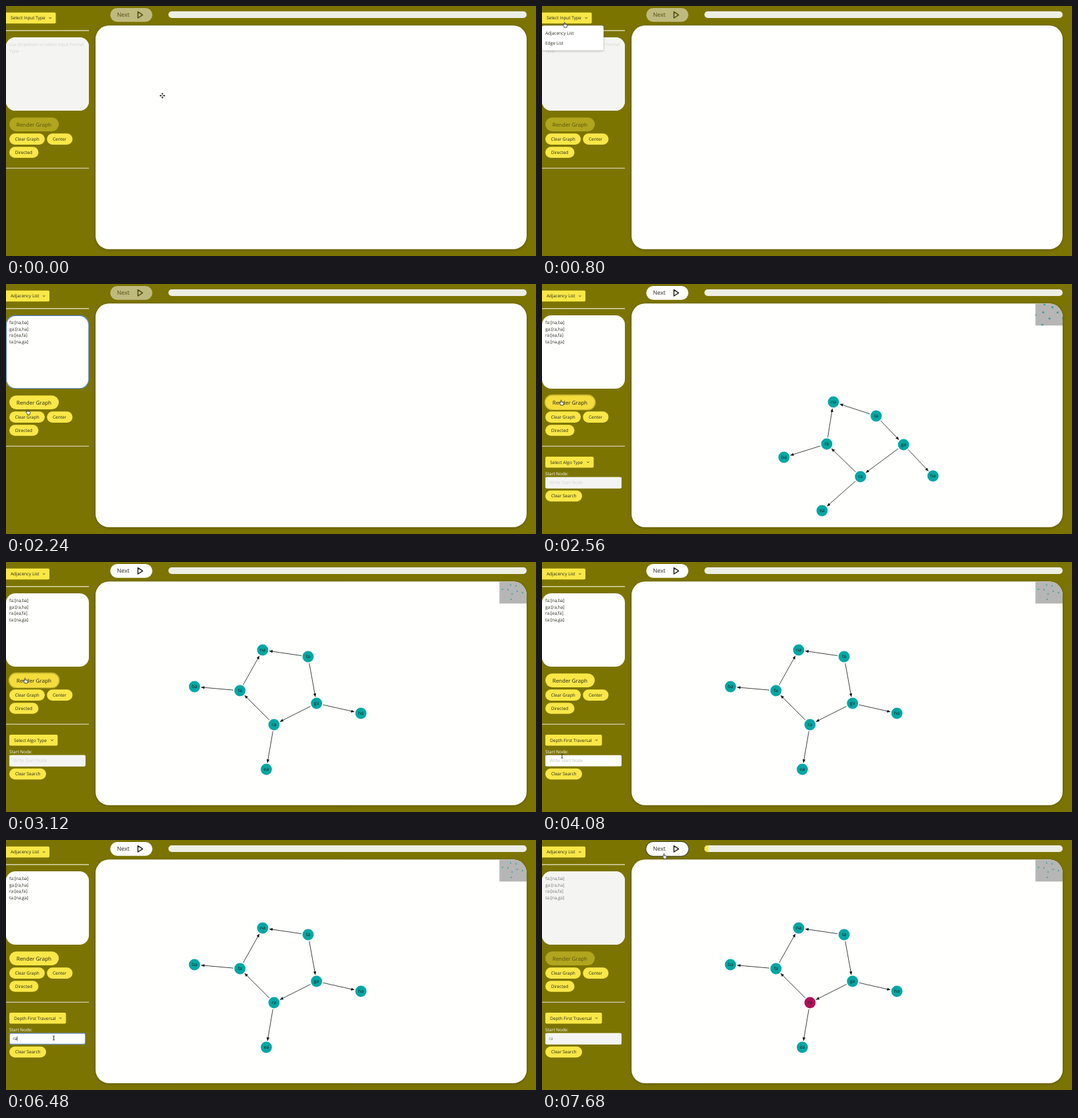
Recreate the animation shown at these times as an HTML page. Size 793x375 px, loop 8 s.

```html
<!DOCTYPE html>
<html lang="en">
<head>
<meta charset="utf-8">
<title>Graph traversal</title>
<style>
  html, body { margin: 0; width: 100%; height: 100%; overflow: hidden; background: #7c7400; }
  svg { display: block; width: 793px; height: 375px; }
  text { font: 6.5px "Open Sans", "Noto Sans", sans-serif; fill: #26261a; text-rendering: geometricPrecision; white-space: pre; }
  .big { font-size: 8px; }
  .next { font-size: 8.6px; }
  .btn { fill: #f8e746; }
  .hover { fill: #f4dc3c; }
  .hr { stroke: #e9e7d2; stroke-width: 1.1; }
  .chev { fill: none; stroke: #26261a; stroke-width: .8; }
  .hint { fill: #c0c1bd; }
  .pale { fill: #d3d4d0; }
  .gray { fill: #747572; }
  .off { fill: #f4f5f2; }
  .on { fill: #fffffe; }
  .focus { fill: none; stroke: #4b79c4; stroke-width: 1.1; }
  .caret { stroke: #222; stroke-width: .7; }
  .node { text-anchor: middle; font-size: 6.8px; fill: #10201f; }
  .edge { stroke: #222; stroke-width: .85; }
  .menu { fill: #fff; stroke: #e2e6e4; stroke-width: .5; filter: drop-shadow(0 1px 1.5px rgba(0,0,0,.25)); }
  .item { fill: #edf1f4; }
  .ink { fill: none; stroke: #222; stroke-width: .9; }
  .stage { fill: #fffffe; filter: drop-shadow(0 1px 2px rgba(0,0,0,.25)); }
</style>
</head>
<body>
<svg viewBox="0 0 793 375">
  <defs>
    <clipPath id="stageClip"><rect x="134" y="29.3" width="645" height="335.5" rx="20"/></clipPath>
    <clipPath id="mapClip"><rect x="738.3" y="29.3" width="40.7" height="33"/></clipPath>
    <clipPath id="barClip"><rect x="243" y="8" width="536" height="10" rx="5"/></clipPath>
    <marker id="tip" markerUnits="userSpaceOnUse" markerWidth="6" markerHeight="5" refX="5" refY="2.2" orient="auto">
      <path d="M0 0L5 2.2L0 4.4z" fill="#111"/>
    </marker>
  </defs>

  <!-- top bar -->
  <g id="next">
    <rect data-on="7680-8000" x="155.5" y="2.5" width="64" height="22" rx="11" fill="none" stroke="#4e513c" stroke-width="1.3"/>
    <rect x="156" y="3" width="63" height="20.7" rx="10.35" fill="#fffffe"/>
    <text class="next" x="166" y="16.4">Next</text>
    <path d="M197.4 8.7V18l7-4.7z" fill="none" stroke="#26261a" stroke-width="1.5" stroke-linejoin="round"/>
  </g>
  <g clip-path="url(#barClip)">
    <rect x="243" y="8" width="536" height="10" fill="#edeee4"/>
    <rect data-on="7680-8000" x="243" y="8" width="6" height="10" fill="#f8e746"/>
  </g>

  <!-- stage -->
  <rect class="stage" x="134" y="29.3" width="645" height="335.5" rx="20"/>
  <g id="graph" clip-path="url(#stageClip)" data-on="2480-8000">
    <g id="edges"></g>
    <g id="nodes"></g>
    <rect x="738.3" y="29.3" width="41" height="33" fill="#b5b6b5"/>
    <g id="dots" clip-path="url(#mapClip)"></g>
  </g>

  <!-- side panel -->
  <path class="hr" d="M0 36.9H124M0 243.3H124"/>
  <g data-on="0-1040">
    <rect class="btn" x="-3" y="9.8" width="77.5" height="16.4" rx="2"/>
    <text x="7" y="20.2">Select Input Type</text>
    <path class="chev" d="M64.4 17.2l1.7 1.6l1.7-1.6"/>
  </g>
  <g data-on="1040-8000">
    <rect class="btn" x="-3" y="9.8" width="68" height="16.4" rx="2"/>
    <text x="7" y="20.2">Adjacency List</text>
    <path class="chev" d="M55 17.2l1.7 1.6l1.7-1.6"/>
  </g>

  <rect class="on" x="0" y="47" width="124" height="110" rx="14"/>
  <rect class="off" data-on="0-1040 7680-8000" x="0" y="47" width="124" height="110" rx="14"/>
  <rect class="focus" data-on="1360-2400" x=".4" y="47.4" width="123.4" height="109.4" rx="14"/>
  <g data-on="0-1040">
    <text class="pale" x="5" y="59.6">use dropdown to select Input Format</text>
    <text class="pale" x="5" y="69.5">Type</text>
  </g>
  <g data-on="1040-1680">
    <text class="hint" x="5" y="59.6">use format as</text>
    <text class="hint" x="6.7" y="69.5">node:[array of adjacent nodes]</text>
    <text class="hint" x="6.7" y="79.4">node:[array of adjacent nodes]</text>
    <text class="hint" x="6.7" y="89.3">...</text>
  </g>
  <g id="list" data-on="1680-8000">
    <text x="5" y="59.6">fa:[na,ba]</text>
    <text x="5" y="69.5">ga:[ra,ha]</text>
    <text x="5" y="79.4">ra:[ea,fa]</text>
    <text x="5" y="89.3">ta:[na,ga]</text>
  </g>
  <path class="caret" data-on="1360-1680" d="M5.3 53.5v7"/>
  <path class="caret" data-on="1680-2000" d="M33.6 83.5v7"/>

  <g id="render">
    <rect data-on="2480-4000" x="4.5" y="166.6" width="75" height="22" rx="11" fill="none" stroke="#cdbd31" stroke-width="1.5"/>
    <rect id="renderBox" class="btn" x="5" y="167.2" width="74" height="20.8" rx="10.4"/>
    <text class="big" x="15.7" y="180.6">Render Graph</text>
  </g>
  <rect class="btn" x="5" y="191.3" width="53" height="16.6" rx="8.3"/>
  <text x="13.5" y="202">Clear Graph</text>
  <rect class="btn" x="61.2" y="191.3" width="38.4" height="16.6" rx="8.3"/>
  <text x="70" y="202">Center</text>
  <rect class="btn" x="5" y="211.2" width="43.6" height="16.6" rx="8.3"/>
  <text x="13.7" y="221.9">Directed</text>

  <g data-on="2480-8000">
    <g data-on="0-4000">
      <rect class="btn" x="5" y="259" width="72.3" height="16.4" rx="2"/>
      <text x="12" y="269.5">Select Algo Type</text>
      <path class="chev" d="M67.3 266.4l1.7 1.6l1.7-1.6"/>
    </g>
    <g data-on="4000-8000">
      <rect class="btn" x="5" y="259" width="84.7" height="16.4" rx="2"/>
      <text x="12" y="269.5">Depth First Traversal</text>
      <path class="chev" d="M79.8 266.4l1.7 1.6l1.7-1.6"/>
    </g>
    <text x="5" y="286.9" style="fill:#fff">Start Node:</text>
    <rect class="on" x="5" y="289.8" width="114" height="16.6" rx="2"/>
    <rect class="off" data-on="0-4000 7680-8000" x="5" y="289.8" width="114" height="16.6" rx="2"/>
    <rect class="focus" data-on="4880-7680" x="5.2" y="290" width="113.6" height="16.2" rx="2"/>
    <text class="pale" data-on="0-4000" x="11" y="300.3">Write Start Node</text>
    <text class="hint" data-on="4000-6320" x="11" y="300.3">Write Start Node</text>
    <text data-on="6320-6480" x="10.2" y="300.3">r</text>
    <text id="start" data-on="6480-8000" x="10.2" y="300.3">ra</text>
    <path class="caret" data-on="4880-5200 5520-5840 6160-6320" d="M11 294.3v7"/>
    <path class="caret" data-on="6320-6480" d="M13.2 294.3v7"/>
    <path class="caret" data-on="6480-6800 7120-7440" d="M16.8 294.3v7"/>
    <rect class="btn" x="5" y="309.8" width="55" height="16.4" rx="8.2"/>
    <text x="13.7" y="320.4">Clear Search</text>
  </g>

  <!-- dropdowns -->
  <g data-on="640-1040">
    <rect class="menu" x="0" y="29.5" width="92" height="37" rx="2.5"/>
    <rect class="item" data-on="960-1040" x="0" y="33" width="92" height="15"/>
    <text x="5" y="43">Adjacency List</text>
    <text x="5" y="58">Edge List</text>
  </g>
  <g data-on="3440-4000">
    <rect class="menu" x="5" y="279" width="87" height="37" rx="2.5"/>
    <rect class="item" data-on="3680-4000" x="5" y="282.5" width="87" height="15"/>
    <text x="10" y="292.4">Depth First Traversal</text>
    <text x="10" y="307.4">Breadth First Traversal</text>
  </g>

  <!-- pointer shapes, centred on 0,0 -->
  <g id="pointer">
    <path data-kind="arrow" d="M-2.5-4V3.2L-.8 1.7L.4 4.3L1.5 3.8L.4 1.3H2.8z" fill="#222" stroke="#fff" stroke-width=".5"/>
    <path data-kind="beam" class="ink" d="M-1.6-3h1.2l.4.4l.4-.4h1.2M0-2.6V2.6M-1.6 3h1.2l.4-.4l.4.4h1.2"/>
    <g data-kind="move">
      <path class="ink" d="M-3 0H3M0-3V3"/>
      <path d="M0-4.3l1.7 1.9h-3.4zM0 4.3l1.7-1.9h-3.4zM-4.3 0l1.9-1.7v3.4zM4.3 0l-1.9-1.7v3.4z" fill="#222"/>
      <circle r=".9" fill="#fff"/>
    </g>
    <path data-kind="hand" d="M-1.7 3.8V2.4L-3.5.3Q-3.5-.8-2.4-.5L-1.6.2V-3.4Q-1-4.5-.3-3.4V-1L2.3-.5Q3.2-.2 3.1.6L2.4 3.8z" fill="#fff" stroke="#222" stroke-width=".8" stroke-linejoin="round"/>
  </g>
</svg>
<script>
const LOOP = 8000, STEP = 80;
const $ = id => document.getElementById(id);
const make = (tag, attrs, parent) => {
  const el = document.createElementNS("http://www.w3.org/2000/svg", tag);
  set(el, attrs);
  return parent.appendChild(el);
};
const set = (el, attrs) => { for (const k in attrs) el.setAttribute(k, attrs[k]); };
const mix = (a, b, k) => a + (b - a) * k;

// name: settled x, y, then x, y while the layout still moves
const places = {
  na: [384, 132, 436, 177], ta: [452, 142, 500, 198], fa: [350, 193, 426, 240], ga: [464.6, 212, 541, 241],
  ba: [282, 187, 362, 260], ra: [401, 244, 476.5, 289], ha: [531, 227, 585, 288], ea: [389.5, 311, 419, 340]
};
const links = "fa-na fa-ba ga-ra ga-ha ra-ea ra-fa ta-na ta-ga".split(" ").map(s => s.split("-"));

// pointer path: time, x, y
const path = [
  [0, 234, 134.5], [80, 160, 112], [160, 68, 89], [240, 68, 89], [560, 42, 19], [720, 40, 20], [960, 24, 45],
  [1120, 24, 46], [1360, 55, 94.5], [1840, 55, 94.5], [2000, 48, 150], [2160, 37, 206], [2320, 29.5, 178],
  [3280, 29.5, 178], [3440, 32, 269], [3520, 32, 269], [3840, 30, 291], [4240, 30, 291], [4480, 100, 312],
  [4560, 127, 308], [4720, 71.5, 297], [6720, 71.5, 297], [6880, 82, 268], [7120, 126, 168], [7360, 174, 60],
  [7520, 183.5, 24.5], [8000, 183.5, 24.5]
];

const nodes = Object.keys(places).map(name => {
  const g = make("g", {}, $("nodes"));
  const disc = make("circle", { r: 8.4 }, g);
  make("text", { class: "node", y: 1.6 }, g).textContent = name;
  return { name, g, disc, dot: make("circle", { fill: "#3f9a9c" }, $("dots")) };
});
const edges = links.map(([from, to]) => ({
  from, to, el: make("line", { class: "edge", "marker-end": "url(#tip)" }, $("edges"))
}));

const timed = [...document.querySelectorAll("[data-on]")].map(el => ({
  el, spans: el.dataset.on.split(" ").map(s => s.split("-").map(Number))
}));
const shapes = [...document.querySelectorAll("[data-kind]")];

function pointAt(t) {
  const i = Math.max(1, path.findIndex(p => p[0] >= t));
  const [a, b] = [path[i - 1], path[i]];
  const k = (t - a[0]) / (b[0] - a[0]);
  return [mix(a[1], b[1], k), mix(a[2], b[2], k)];
}

function kindAt(x, y, t) {
  const inside = (l, top, r, b) => x >= l && x <= r && y >= top && y <= b;
  if (t >= 640 && t < 1200 && y < 66) return "hand";
  if (t >= 3440 && t < 4000) return "hand";
  if (inside(134, 29, 779, 365)) return "move";
  if (inside(0, 47, 124, 157)) return t < 1040 ? "arrow" : "beam";
  if (t >= 4000 && inside(5, 289, 119, 307)) return "beam";
  const button = inside(0, 10, 74, 26) || inside(5, 167, 79, 188) || inside(5, 191, 99, 208) ||
    inside(5, 259, 77, 275) || inside(5, 310, 60, 326) || inside(156, 3, 219, 29);
  return button ? "hand" : "arrow";
}

function drawGraph(t) {
  const k = Math.pow(Math.max(0, (3120 - t) / 560), 1.6);
  const scale = .12 + .067 * k;
  const at = {};
  for (const n of nodes) {
    const [x, y, x0, y0] = places[n.name];
    const p = at[n.name] = [mix(x, x0, k), mix(y, y0, k)];
    set(n.g, { transform: `translate(${p})` });
    set(n.disc, { fill: n.name === "ra" && t >= 7680 ? "#b30f58" : "#04a6a3" });
    set(n.dot, {
      cx: 757.8 + (p[0] - mix(406.7, 468, k)) * scale,
      cy: 43.4 + (p[1] - mix(206, 254, k)) * scale + 1.8 * k,
      r: 8.4 * scale
    });
  }
  for (const e of edges) {
    const [a, b] = [at[e.from], at[e.to]];
    const dx = b[0] - a[0], dy = b[1] - a[1], gap = 10 / Math.hypot(dx, dy);
    set(e.el, { x1: a[0] + dx * gap, y1: a[1] + dy * gap, x2: b[0] - dx * gap, y2: b[1] - dy * gap });
  }
}

function draw(t) {
  for (const { el, spans } of timed)
    el.style.display = spans.some(([a, b]) => t >= a && t < b) ? "" : "none";

  const locked = t >= 7680;
  const [x, y] = pointAt(t);
  const overRender = x > 5 && x < 79 && y > 167 && y < 188;
  set($("renderBox"), { class: overRender ? "hover" : "btn" });
  set($("render"), { opacity: t < 1040 || locked ? .43 : 1 });
  set($("next"), { opacity: t < 2480 ? .5 : 1 });
  for (const line of $("list").children) set(line, { class: locked ? "gray" : "" });
  set($("start"), { class: locked ? "gray" : "" });

  const kind = kindAt(x, y, t);
  for (const s of shapes) s.style.display = s.dataset.kind === kind ? "" : "none";
  set($("pointer"), { transform: `translate(${x} ${y})` });
  if (t >= 2480) drawGraph(t);
}

const begin = performance.now();
function tick() {
  const t = (performance.now() - begin) % LOOP;
  draw(Math.floor(t / STEP) * STEP);
  requestAnimationFrame(tick);
}
tick();
</script>
</body>
</html>
```
